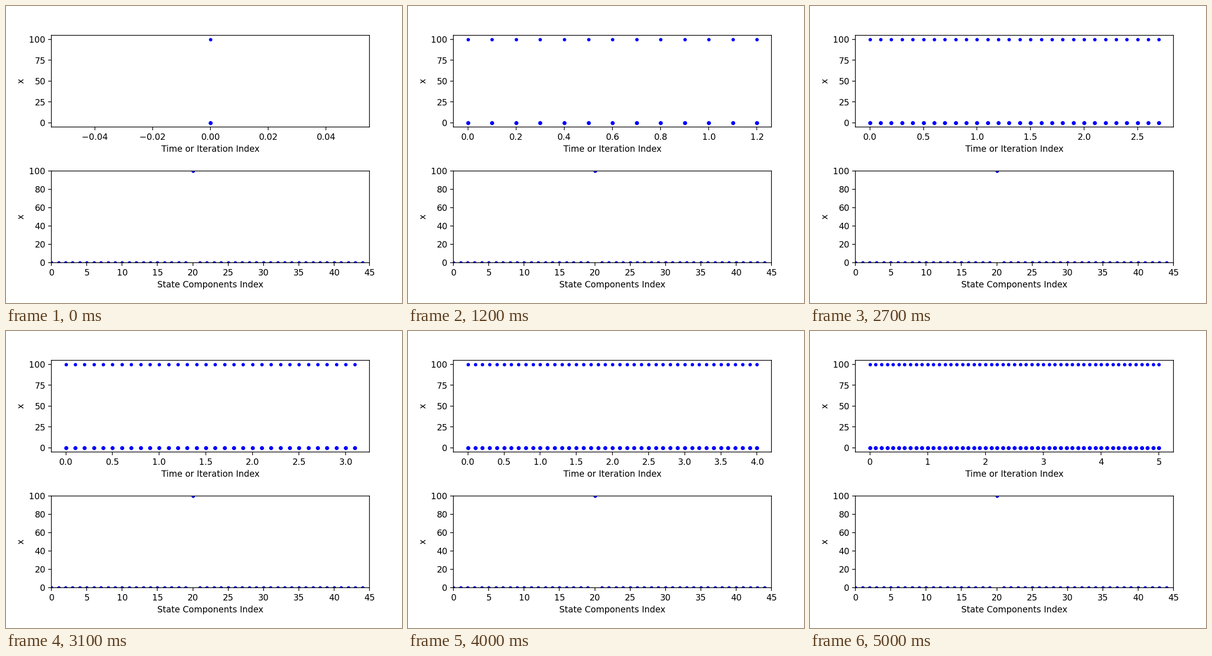
A matplotlib script that plays this animation: 864 px wide and 648 px high, repeating every 5.1 s.

```python
import numpy as np
import matplotlib.pyplot as plt
from matplotlib.animation import FuncAnimation

W, H, DPI = 864, 648, 135
FRAMES, INTERVAL = 51, 100
STEP = 0.1

# State: all zeros except one component
state = np.zeros(45)
state[20] = 100

plt.rcParams.update({"font.family": "DejaVu Sans", "font.size": 10})
fig = plt.figure(figsize=(W / DPI, H / DPI), dpi=DPI, facecolor="white")


def add_panel(top, xlabel):
    """Axes with its upper edge `top` pixels below the figure's top."""
    left, width, height = 99.2, 693.8, 200.0
    ax = fig.add_axes([left / W, 1 - (top + height) / H, width / W, height / H])
    ax.set_xlabel(xlabel)
    ax.set_ylabel("x")
    return ax


history = add_panel(63.7, "Time or Iteration Index")
profile = add_panel(359.7, "State Components Index")

tracks = [history.plot([], [], "b.")[0] for _ in state]
profile.plot(np.arange(len(state)), state, "b.")
profile.set_xlim(0, 45)
profile.set_ylim(0, 100)


def update(frame):
    times = np.arange(frame + 1) * STEP
    for track, value in zip(tracks, state):
        track.set_data(times, np.full(len(times), value))
    history.relim()
    history.autoscale_view()
    return tracks


anim = FuncAnimation(fig, update, frames=FRAMES, interval=INTERVAL,
                     init_func=lambda: update(0), repeat=True, repeat_delay=0)
plt.show()
```
